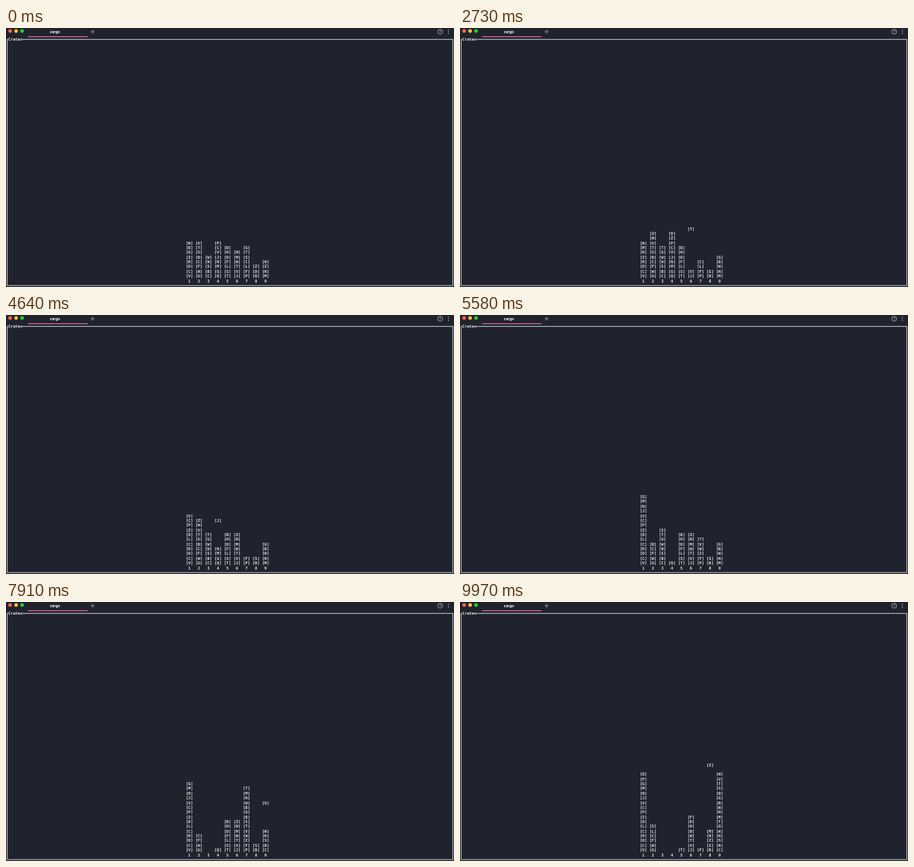
These frames come from a looping animation (600x348 px, 10000 ms). An HTML page with a canvas:

```html
<!DOCTYPE html>
<html lang="en">
<head>
<meta charset="utf-8">
<title>Crates</title>
<style>
  html, body { margin: 0; width: 600px; height: 348px; overflow: hidden; background: #20232e; }
  canvas { display: block; }
</style>
</head>
<body>
<canvas id="stage" width="600" height="348"></canvas>
<script>
const ctx = document.getElementById('stage').getContext('2d');
const LOOP = 10000;
const MONO = 'bold 5.3px "DejaVu Sans Mono", "Noto Sans Mono", monospace';
const SANS = 'Roboto, Inter, sans-serif';
const LIGHT = '#e6e6e8';
const CROSS_TICKS = 3; // ticks to pass one column sideways

const START = ['VCDRZGBW', 'GWFCBSTV', 'CBSNW', 'QGMNJVCP', 'TSLFDHB',
  'JVTWMN', 'PFLCSTG', 'BDZ', 'MNZW'];

// count, from, to
const MOVES = `2 8 4, 2 7 3, 2 9 2, 4 1 9, 1 9 1, 1 7 8, 5 6 1, 6 1 6, 2 7 1, 9 4 1, 6 2 7,
  5 9 7, 7 3 7, 19 7 9, 1 7 1, 1 4 1, 3 6 8, 4 5 6, 2 5 2, 1 9 7, 1 9 8`
  .split(',').map(m => m.trim().split(' ').map(Number));

// time in ms, tick reached
const PACE = [[376, 0], [1390, 177.5], [2730, 406.5], [4640, 735.5],
  [6450, 1039.5], [7910, 1298.5], [9970, 1652.5]];

// One entry per tick: the resting stacks plus the crate in the air
function buildTicks() {
  const ticks = [{ stacks: START }];
  let stacks = START;
  const carry = (from, to) => {
    const span = stacks.slice(Math.min(from, to), Math.max(from, to) + 1);
    const top = Math.max(...span.map(s => s.length));
    const crate = stacks[from].slice(-1);
    const rest = stacks.map((s, i) => i === from ? s.slice(0, -1) : s);
    let row = rest[from].length, col = from;
    const add = () => ticks.push({ stacks: rest, crate, col, row });
    while (row < top) { row++; add(); }
    while (col !== to) {
      col += Math.sign(to - from);
      for (let i = 0; i < CROSS_TICKS; i++) add();
    }
    while (row > rest[to].length) { row--; add(); }
    stacks = rest.map((s, i) => i === to ? s + crate : s);
  };
  for (const [count, from, to] of MOVES)
    for (let i = 0; i < count; i++) carry(from - 1, to - 1);
  return ticks;
}
const TICKS = buildTicks();

function tickAt(t) {
  if (t <= PACE[0][0]) return 0;
  for (let i = 1; i < PACE.length; i++) {
    const [t0, a] = PACE[i - 1], [t1, b] = PACE[i];
    if (t <= t1) return Math.floor(a + (b - a) * (t - t0) / (t1 - t0));
  }
  return Math.floor(PACE[PACE.length - 1][1]);
}

function text(str, x, y, font, color = LIGHT, align = 'center') {
  ctx.font = font;
  ctx.fillStyle = color;
  ctx.textAlign = align;
  ctx.fillText(str, x, y);
}

function dot(x, y, r, color) {
  ctx.fillStyle = color;
  ctx.beginPath();
  ctx.arc(x, y, r, 0, Math.PI * 2);
  ctx.fill();
}

function rect(x, y, w, h, color) {
  ctx.fillStyle = color;
  ctx.fillRect(x, y, w, h);
}

function drawWindow() {
  rect(0, 0, 600, 348, '#20232e');
  rect(0, 0, 600, 12, '#20222c');

  ['#ff5f57', '#febc2e', '#28c840'].forEach((c, i) => dot(5.5 + 8 * i, 4, 2.5, c));
  text('cargo', 65.5, 7, 'bold 5.3px ' + SANS, '#f0f0f2');
  rect(29.5, 11, 80, 1.2, '#d863ab');
  rect(113.3, 4.6, 5.4, 0.8, '#a4a5ab');
  rect(115.6, 2.3, 0.8, 5.4, '#a4a5ab');

  ctx.strokeStyle = '#b4b5ba';
  ctx.lineWidth = 0.8;
  ctx.beginPath();
  ctx.arc(581.5, 5, 3.3, 0, Math.PI * 2);
  ctx.stroke();
  text('?', 581.5, 7, '5.5px ' + SANS, '#c4c5ca');
  for (const y of [2.6, 5, 7.4]) dot(592.5, y, 0.7, '#b4b5ba');

  ctx.strokeStyle = '#c9cacd';
  ctx.lineWidth = 1;
  ctx.strokeRect(1.6, 15.3, 596.8, 330.8);
  rect(3, 13, 19, 5, '#20232e');
  text('Crates', 3, 17.4, MONO, LIGHT, 'left');
}

const colX = col => 245.7 + 12.75 * col;
const rowY = row => 335.2 - 6.365 * row;

function drawCrate(letter, col, row) {
  text(`[${letter}]`, colX(col), rowY(row), MONO);
}

function draw(t) {
  drawWindow();
  const { stacks, crate, col, row } = TICKS[tickAt(t)];
  stacks.forEach((stack, i) => {
    [...stack].forEach((letter, r) => drawCrate(letter, i, r));
    text(i + 1, colX(i), rowY(-1), MONO);
  });
  if (crate) drawCrate(crate, col, row);
}

const begin = performance.now();
function loop() {
  draw((performance.now() - begin) % LOOP);
  requestAnimationFrame(loop);
}
loop();
</script>
</body>
</html>
```
